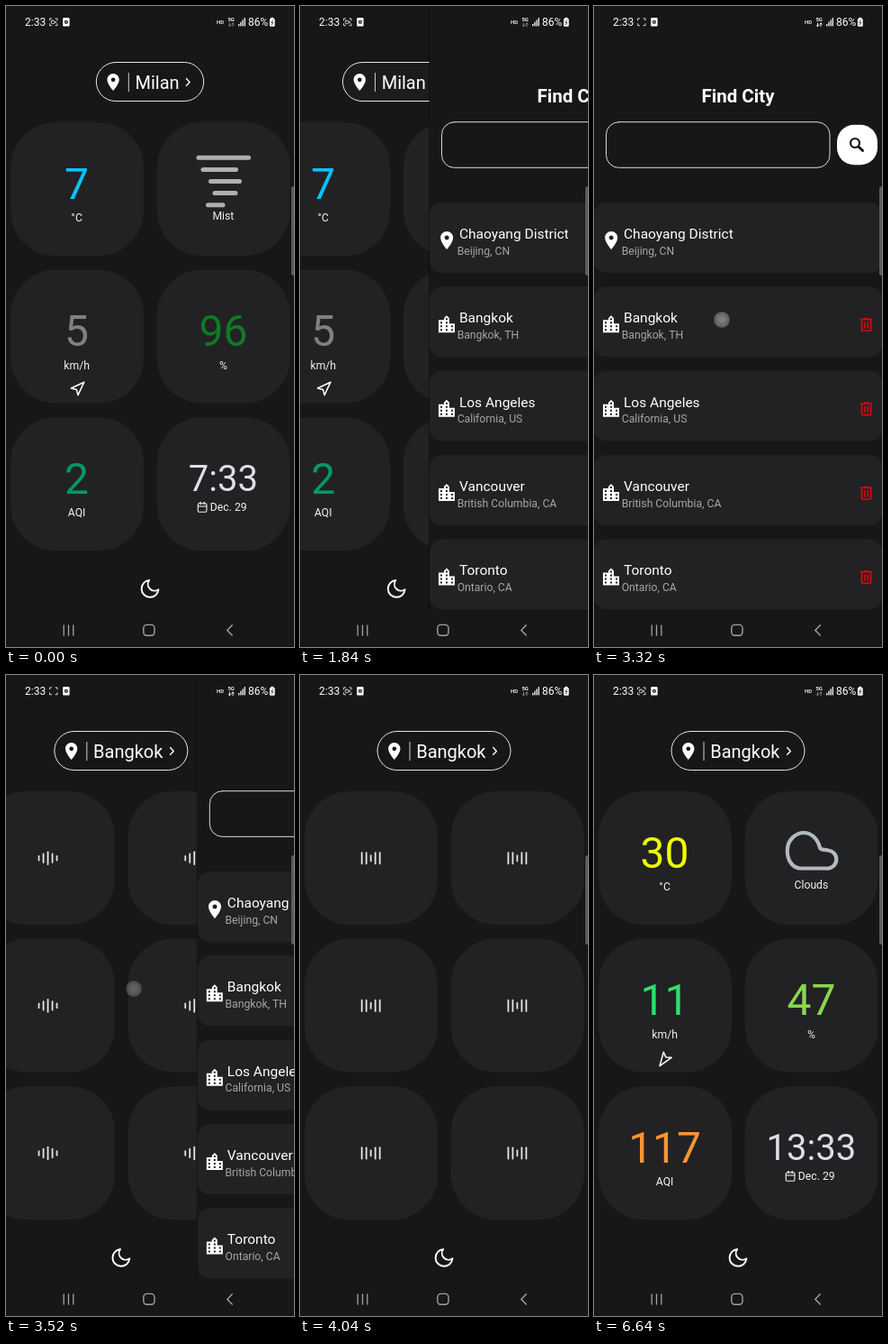
Write an HTML page with a canvas that moves like this. It is 320 px wide and 711 px high and loops after 6720 ms.

```html
<!DOCTYPE html>
<html lang="en">
<head>
<meta charset="utf-8">
<title>Weather app</title>
<style>
  html, body { margin: 0; width: 100%; height: 100%; overflow: hidden; background: #171719; }
  canvas { display: block; width: 320px; height: 711px; }
</style>
</head>
<body>
<canvas id="stage"></canvas>
<script>
const W = 320, H = 711, LOOP = 6720;
const BG = '#171719', CARD = '#222224', WHITE = '#fff';
const PUSH = 1740, POP = 3396, LOADED = 4490;
const BLINKS = [200, 680, 1200, 1680, 2200, 2680, 3160, 3680, 4200, 4680, 5200, 5680, 6160, 6640];

const canvas = document.getElementById('stage');
const ctx = canvas.getContext('2d');
const dpr = window.devicePixelRatio || 1;
canvas.width = W * dpr;
canvas.height = H * dpr;

const icons = {
  pin: new Path2D('M12 2C8.13 2 5 5.13 5 9c0 5.25 7 13 7 13s7-7.75 7-13c0-3.87-3.13-7-7-7zm0 9.5a2.5 2.5 0 0 1 0-5 2.5 2.5 0 0 1 0 5z'),
  city: new Path2D('M15 11V5l-3-3-3 3v2H3v14h18V11h-6zm-8 8H5v-2h2v2zm0-4H5v-2h2v2zm0-4H5V9h2v2zm6 8h-2v-2h2v2zm0-4h-2v-2h2v2zm0-4h-2V9h2v2zm0-4h-2V5h2v2zm6 12h-2v-2h2v2zm0-4h-2v-2h2v2z'),
  trash: new Path2D('M9 3V4H4V6H5V19A2 2 0 0 0 7 21H17A2 2 0 0 0 19 19V6H20V4H15V3H9M7 6H17V19H7V6M9 8V17H11V8H9M13 8V17H15V8H13Z'),
  moon: new Path2D('M21 12.79A9 9 0 1 1 11.21 3 7 7 0 0 0 21 12.79z'),
  arrow: new Path2D('M3 11L22 2L13 21L11 13Z'),
  cloud: new Path2D('M230 214.5H258.5A10 10 0 0 0 260 194.5C256 193.5 252 194.5 251 191.5C248 180 240 175 233 175C225 175 214.8 182 214.8 195C214.8 206 221 214.5 230 214.5Z')
};

const milan = {
  name: 'Milan', pillX: 100.3, pillW: 119.4, sky: 'Mist', wind: 0, clock: '7:33',
  temp: ['7', '#05c4ff'], speed: ['5', '#808080'], humid: ['96', '#0e7a24'], aqi: ['2', '#009966']
};
const bangkok = {
  name: 'Bangkok', pillX: 86, pillW: 148, sky: 'Clouds', wind: 170, clock: '13:33',
  temp: ['30', '#eeff00'], speed: ['11', '#2fe068'], humid: ['47', '#88d84e'], aqi: ['117', '#fb9430']
};
const cities = [
  ['Chaoyang District', 'Beijing, CN'], ['Bangkok', 'Bangkok, TH'], ['Los Angeles', 'California, US'],
  ['Vancouver', 'British Columbia, CA'], ['Toronto', 'Ontario, CA']
];

const clamp = v => Math.max(0, Math.min(1, v));
const ramp = (t, from, to) => clamp((t - from) / (to - from));

// Critically damped spring, 0 to 1
function spring(ms) {
  if (ms <= 0) return 0;
  const u = 18.26 * ms / 1000;
  return ms > 480 ? 1 : 1 - Math.exp(-u) * (1 + u);
}

function text(str, x, y, size, color = WHITE, align = 'left', weight = 400) {
  ctx.font = `${weight} ${size}px Roboto, Arial, sans-serif`;
  ctx.textAlign = align;
  ctx.fillStyle = color;
  ctx.fillText(str, x, y);
}

function box(x, y, w, h, r, fill, stroke, lw = 1) {
  ctx.beginPath();
  ctx.roundRect(x, y, w, h, r);
  if (fill) { ctx.fillStyle = fill; ctx.fill(); }
  if (stroke) { ctx.strokeStyle = stroke; ctx.lineWidth = lw; ctx.stroke(); }
}

function line(points, color = WHITE, lw = 1, cap = 'round') {
  ctx.beginPath();
  points.forEach(([x, y], i) => i ? ctx.lineTo(x, y) : ctx.moveTo(x, y));
  ctx.strokeStyle = color;
  ctx.lineWidth = lw;
  ctx.lineCap = cap;
  ctx.lineJoin = 'round';
  ctx.stroke();
}

function dot(x, y, r, color) {
  ctx.beginPath();
  ctx.arc(x, y, r, 0, 7);
  ctx.fillStyle = color;
  ctx.fill();
}

// Icons live on a 24 unit grid, centred on x, y
function icon(path, x, y, scale, color = WHITE, stroke = 0, angle = 0) {
  ctx.save();
  ctx.translate(x, y);
  ctx.rotate(angle * Math.PI / 180);
  ctx.scale(scale, scale);
  ctx.translate(-12, -12);
  ctx.lineJoin = 'round';
  if (stroke) {
    ctx.strokeStyle = color;
    ctx.lineWidth = stroke;
    ctx.stroke(path);
  } else {
    ctx.fillStyle = color;
    ctx.fill(path, 'evenodd');
  }
  ctx.restore();
}

function loader(x, y, t) {
  for (let i = -2; i <= 2; i++) {
    const lag = [0, 0.24, 0.5][Math.abs(i)];
    const h = 11 + 4.5 * Math.cos(2 * Math.PI * ((t - 3520) / 1400 - lag));
    box(x + i * 5 - 0.9, y - h / 2, 1.8, h, 0.9, '#e4e4e6');
  }
}

function pill(city, press) {
  const x = city.pillX, right = x + city.pillW;
  box(x, 62.5, city.pillW, 43, 21.5, press ? `rgba(255,255,255,${0.2 * press})` : null, '#e6e6e6');
  icon(icons.pin, x + 18.8, 84.6, 0.95);
  line([[x + 36, 74], [x + 36, 95]], '#d0d0d0', 1, 'butt');
  text(city.name, x + 43.2, 92, 20);
  line([[right - 19.3, 80.5], [right - 15.6, 84.4], [right - 19.3, 88.3]], WHITE, 1.4);
}

function sky(kind) {
  if (kind === 'Mist') {
    [[214, 269.5], [219, 255.5], [227.5, 259.5], [232, 255], [224.5, 241]].forEach(([a, b], i) =>
      line([[a, 168.3 + i * 13.1], [b, 168.3 + i * 13.1]], '#adb1b1', 5));
  } else {
    ctx.strokeStyle = '#b2babb';
    ctx.lineWidth = 4.2;
    ctx.lineJoin = 'round';
    ctx.stroke(icons.cloud);
  }
}

function readings(city) {
  const L = 78.6, R = 241.4;
  const label = (s, x, y) => text(s, x, y, 12.2, '#f2f2f2', 'center');
  const value = ([s, color], x, y) => text(s, x, y, 48, color, 'center');
  value(city.temp, L, 214);
  label('°C', L, 239);
  sky(city.sky);
  label(city.sky, R, 237);
  value(city.speed, L, 377.3);
  label('km/h', L, 402.5);
  icon(icons.arrow, 79.2, 424.8, 0.76, WHITE, 2, city.wind);
  value(city.humid, R, 377.3);
  label('%', R, 402.5);
  value(city.aqi, L, 541);
  label('AQI', L, 566);
  text(city.clock, R, 537.5, 40, '#dedee4', 'center');
  box(213.3, 551.7, 9.6, 9.6, 1.2, null, '#f2f2f2', 1.1);
  line([[213.3, 555], [222.9, 555]], '#f2f2f2', 1.1);
  line([[216, 550.3], [216, 552.8]], '#f2f2f2', 1.1);
  line([[220.2, 550.3], [220.2, 552.8]], '#f2f2f2', 1.1);
  text('Dec. 29', 226.8, 560.3, 12.2, '#f2f2f2');
}

function home(t) {
  const city = t < 2600 ? milan : bangkok;
  pill(city, ramp(t, 1420, 1540) * (1 - ramp(t, 1660, 1860)));
  for (let row = 0; row < 3; row++) {
    for (let col = 0; col < 2; col++) {
      const x = 5 + col * 162.7, y = 129 + row * 163.6;
      box(x, y, 148, 148, 50, CARD);
      if (city === bangkok && t < LOADED) loader(x + 73.7, y + 74.2, t);
    }
  }
  if (city === milan || t >= LOADED) {
    const k = 1 - ramp(t, LOADED, LOADED + 320);
    ctx.globalAlpha = city === milan ? 1 : 1 - k * k;
    readings(city);
    ctx.globalAlpha = 1;
  }
  icon(icons.moon, 160, 646.4, 1.05, WHITE, 1.8);
}

function cityRow([name, place], i) {
  const y = 218 + i * 93.35;
  box(0, y, W, 78, 14, CARD);
  if (i) {
    icon(icons.city, 19, y + 42, 1);
    icon(icons.trash, 302.6, y + 42.2, 0.84, '#d40a10');
  } else {
    icon(icons.pin, 19.2, y + 42, 1);
  }
  text(name, 33, y + 40, 15.5);
  text(place, 30.7, y + 57.5, 12.2, '#a6a6a8');
}

function finder() {
  ctx.fillStyle = BG;
  ctx.fillRect(0, 0, W, 673);
  text('Find City', 160, 107.3, 20.5, WHITE, 'center', 700);
  box(13.5, 128.7, 248.5, 50.6, 14, null, '#dcdcdc');
  box(270, 131.7, 45, 44.6, 19, WHITE);
  ctx.beginPath();
  ctx.arc(290, 152, 5, 0, 7);
  ctx.strokeStyle = '#0a0a0a';
  ctx.lineWidth = 2.2;
  ctx.stroke();
  line([[293.9, 155.9], [298.6, 160.6]], '#0a0a0a', 2.8);
  cities.forEach(cityRow);
}

function touch(t, x, y, from, to) {
  const a = ramp(t, from, from + 60) * (1 - ramp(t, to, to + 140));
  if (!a) return;
  const glow = ctx.createRadialGradient(x, y, 2, x, y, 9.5);
  glow.addColorStop(0, `rgba(255,255,255,${0.42 * a})`);
  glow.addColorStop(0.8, `rgba(255,255,255,${0.28 * a})`);
  glow.addColorStop(1, 'rgba(255,255,255,0)');
  dot(x, y, 9.5, glow);
}

function statusBar(t) {
  text('2:33', 21, 22, 12);
  const recording = BLINKS.filter(b => b <= t).length % 2 === 0;
  for (const sx of [-1, 1]) {
    for (const sy of [-1, 1]) {
      const x = 52.8 + sx * 4.2, y = 17.8 + sy * 3.9;
      line([[x - sx * 2, y], [x, y], [x, y - sy * 2]], '#d8d8d8', 1);
    }
  }
  if (recording) {
    box(50.4, 16.2, 3.4, 3.4, 0.8, null, '#d8d8d8', 0.9);
    line([[54.3, 17.9], [55.6, 16.8], [55.6, 19], [54.3, 17.9]], '#d8d8d8', 0.7);
  }
  box(63.2, 13, 7.4, 9.6, 1.2, WHITE);
  dot(66.9, 17.8, 2.1, '#222');
  dot(66.9, 17.8, 0.8, WHITE);

  text('HD', 234, 20.3, 6, '#e4e4e4', 'left', 700);
  text('5G', 246.4, 17.4, 6, '#f0f0f0', 'left', 700);
  const busy = (t >= 2120 && t < 3680) || (t >= 5160 && t < 5680);
  const c = busy ? '#fff' : '#88888a';
  line([[248.5, 19], [248.5, 22.6]], c, 0.9);
  line([[247.2, 21.4], [248.5, 22.8], [249.8, 21.4]], c, 0.9);
  line([[252, 19], [252, 22.6]], c, 0.9);
  line([[250.7, 20.3], [252, 18.9], [253.3, 20.3]], c, 0.9);
  for (let i = 0; i < 4; i++) {
    const h = 2.4 + i * 2.3;
    ctx.fillStyle = '#e8e8e8';
    ctx.fillRect(258 + i * 2.2, 22.4 - h, 1.4, h);
  }
  text('86%', 269, 22, 12);
  box(294.4, 12.8, 2.8, 2, 0.5, WHITE);
  box(292.9, 13.9, 5.8, 8.9, 1.2, WHITE);
  line([[296.4, 15.8], [294.8, 18.5], [296.9, 18.4], [295.2, 21]], '#222', 0.8);
}

function navBar() {
  const c = '#a2a2a4';
  for (const x of [64.2, 69.5, 74.8]) line([[x, 687], [x, 698]], c, 1.3);
  box(152.8, 686.4, 12.2, 11.8, 3.6, null, c, 1.4);
  line([[251.3, 686.8], [245.8, 692.4], [251.3, 698]], c, 1.4);
}

function draw(t) {
  ctx.setTransform(dpr, 0, 0, dpr, 0, 0);
  ctx.fillStyle = BG;
  ctx.fillRect(0, 0, W, H);

  const shown = spring(t - PUSH) - spring(t - POP);
  ctx.save();
  ctx.beginPath();
  ctx.rect(0, 0, W, 673);
  ctx.clip();
  if (shown < 1) {
    ctx.save();
    ctx.translate(-0.3 * W * shown, 0);
    home(t);
    ctx.restore();
  }
  if (shown > 0) {
    const x = W * (1 - shown);
    ctx.save();
    ctx.translate(x, 0);
    if (shown < 1) {
      ctx.fillStyle = 'rgba(0,0,0,0.35)';
      ctx.fillRect(-1, 0, 1, 673);
    }
    finder();
    ctx.restore();
  }
  ctx.restore();

  touch(t, 161, 85, 1420, 1650);
  touch(t, 142, 348, 3180, 3480);
  statusBar(t);
  navBar();
  box(317, 200, 6, 99, 2.5, '#5c5c5e');
}

const start = performance.now();
function tick() {
  draw((performance.now() - start) % LOOP);
  requestAnimationFrame(tick);
}
tick();
</script>
</body>
</html>
```
